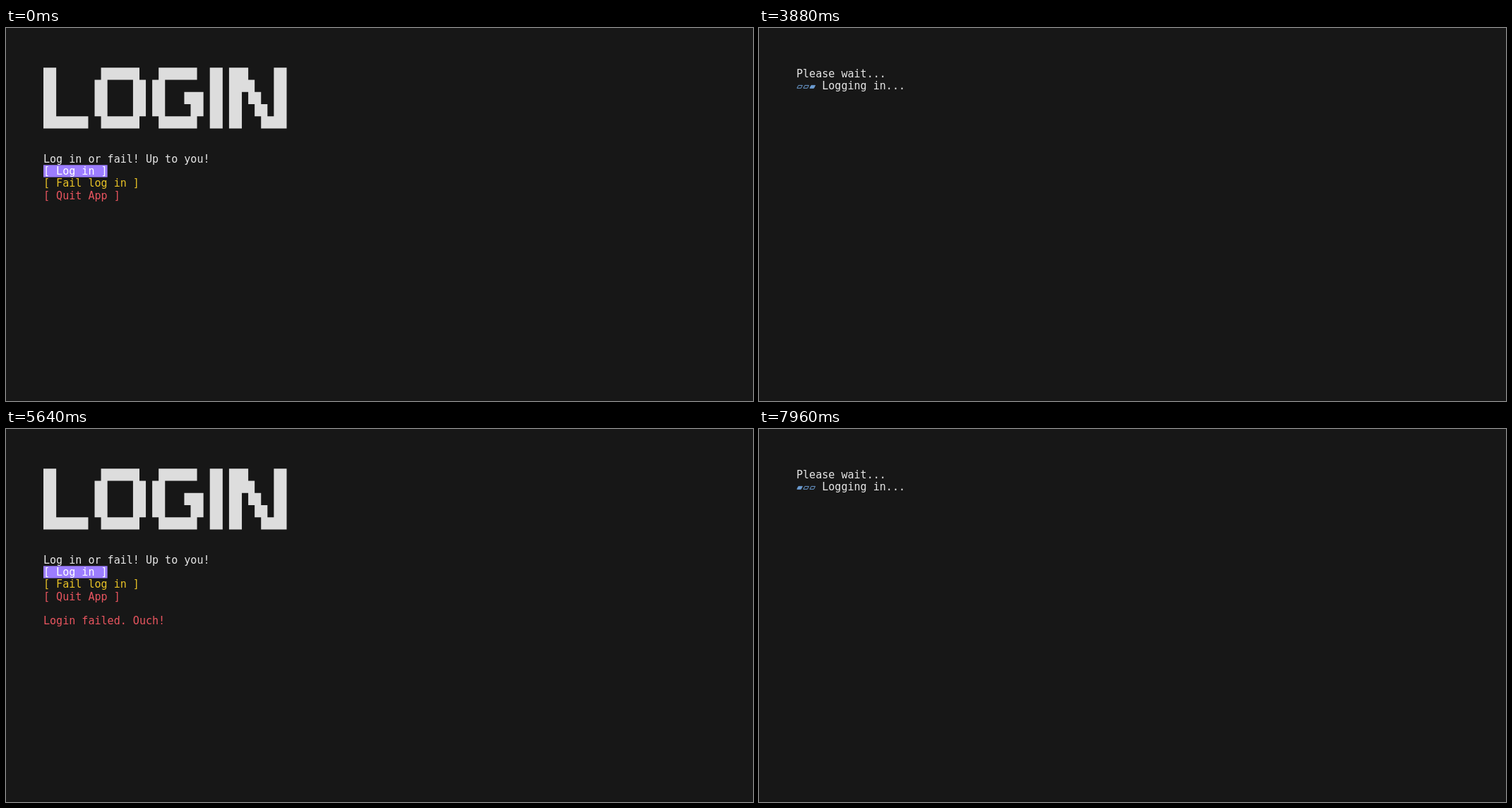
An HTML page for the animation above (8 s loop, 1058 by 529 pixels).

```html
<!DOCTYPE html>
<html lang="en">
<head>
<meta charset="utf-8">
<title>Login</title>
<style>
  html, body { margin: 0; width: 100%; height: 100%; overflow: hidden; background: #171717; }
  svg { display: block; width: 1058px; height: 529px; }
  text { font: 15.06px "DejaVu Sans Mono", monospace; white-space: pre; }
</style>
</head>
<body>
<svg id="stage" viewBox="0 0 1058 529"></svg>
<script>
const LOOP = 8000;
const X = 53, Y = 56.3, CW = 9.066, RH = 17.25;
const FG = '#e6e6e6', RED = '#e9555f', BLUE = '#6b9bd0';

const BANNER = [
  '##       ######   ######  ## ###    ##',
  '##      ##    ## ##       ## ####   ##',
  '##      ##    ## ##   ### ## ## ##  ##',
  '##      ##    ## ##    ## ## ##  ## ##',
  '#######  ######   ######  ## ##   ####'
];

const BUTTONS = [
  { label: '[ Log in ]', color: '#9c7dff', ink: '#ffffff' },
  { label: '[ Fail log in ]', color: '#e8c226', ink: '#171717' },
  { label: '[ Quit App ]', color: RED, ink: '#ffffff' }
];

const SPIN = [0, 1, 2, 1];

// [start, view, selected button, failure message]
const SCENES = [
  [0, 'menu', 0, false],
  [800, 'menu', 1, false],
  [3160, 'wait'],
  [4800, 'menu', 1, true],
  [5640, 'menu', 0, true],
  [6400, 'wait']
];

// spinner ticks for each wait, keyed by its start
const TICKS = {
  3160: [3200, 3360, 3480, 3600, 3760, 3880, 4040, 4160, 4280, 4440, 4560, 4680],
  6400: [6480, 6600, 6760, 6880, 7040, 7160, 7280, 7440, 7560, 7720, 7840, 7960]
};

const stage = document.getElementById('stage');
const colX = c => X + c * CW;
const rowY = r => Y + r * RH;

const text = (s, row, fill, col = 0) =>
  `<text x="${colX(col)}" y="${rowY(row) + 13.9}" fill="${fill}">${s}</text>`;

const bar = (row, cols, fill) =>
  `<rect x="${X}" y="${rowY(row)}" width="${cols * CW}" height="${RH}" fill="${fill}"/>`;

function banner() {
  let d = '';
  BANNER.forEach((line, r) => {
    for (const run of line.matchAll(/#+/g)) {
      d += `M${colX(run.index)} ${rowY(r)}h${run[0].length * CW}v${RH}h${-run[0].length * CW}z`;
    }
  });
  return `<path d="${d}" fill="#dddddd"/>`;
}

function menu(selected, failed) {
  let out = banner() + text('Log in or fail! Up to you!', 7, FG);
  BUTTONS.forEach(({ label, color, ink }, i) => {
    const on = i === selected;
    if (on) out += bar(8 + i, label.length, color);
    out += text(label, 8 + i, on ? ink : color);
  });
  return failed ? out + text('Login failed. Ouch!', 12, RED) : out;
}

function wait(step) {
  let out = text('Please wait...', 0, FG) + text('Logging in...', 1, FG, 4);
  for (let i = 0; i < 3; i++) {
    const fill = i === SPIN[step % SPIN.length] ? BLUE : 'none';
    out += `<path d="M${colX(i) + 0.9} 85.3l2-3.9h5.5l-2 3.9z" fill="${fill}" stroke="${BLUE}"/>`;
  }
  return out;
}

let shown = '';
function draw(t) {
  const [start, view, selected, failed] = SCENES.findLast(s => s[0] <= t);
  const step = view === 'wait' ? TICKS[start].filter(k => k <= t).length : 0;
  const key = start + ':' + step;
  if (key === shown) return;
  shown = key;
  stage.innerHTML = view === 'menu' ? menu(selected, failed) : wait(step);
}

const origin = performance.now();
function frame() {
  draw((performance.now() - origin) % LOOP);
  requestAnimationFrame(frame);
}
frame();
</script>
</body>
</html>
```
